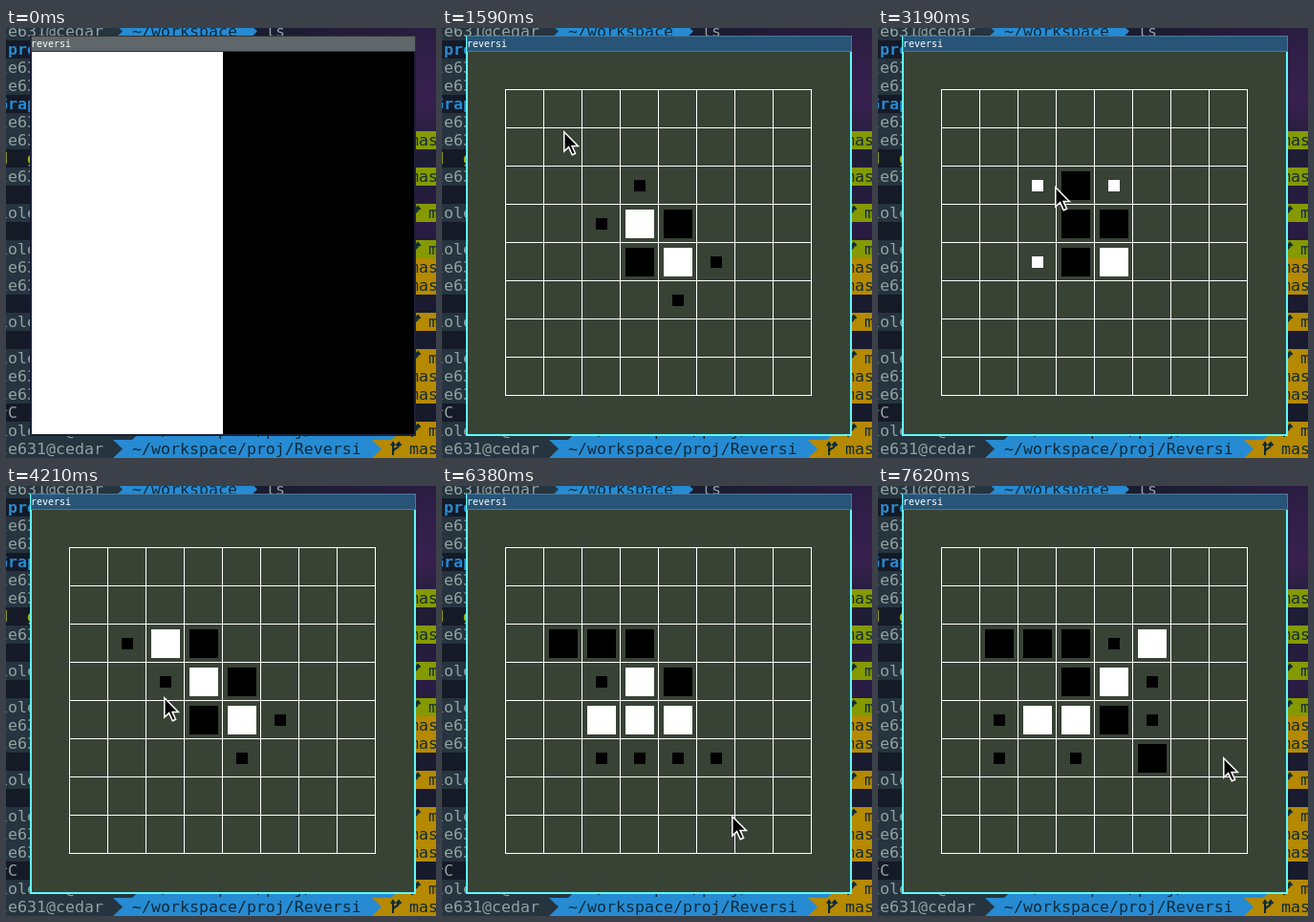
Recreate the animation shown at these times as an HTML page. Size 450x450 px, loop 8 s.

```html
<!DOCTYPE html>
<html lang="en">
<head>
<meta charset="utf-8">
<title>reversi</title>
<style>
html, body { margin: 0; width: 100%; height: 100%; overflow: hidden; background: #161a27; }
svg { display: block; width: 450px; height: 450px; }
text { font-family: "DejaVu Sans Mono", monospace; white-space: pre; }
.term text { font-size: 16.6px; }
.sharp { shape-rendering: crispEdges; }
</style>
</head>
<body>
<svg id="stage" viewBox="0 0 450 450">
  <defs>
    <linearGradient id="sky" x2="1" y2="0">
      <stop offset="0" stop-color="#151a27"/>
      <stop offset=".6" stop-color="#1a1c30"/>
      <stop offset="1" stop-color="#2b1d42"/>
    </linearGradient>
    <linearGradient id="side" x2="0" y2="1">
      <stop offset="0" stop-color="#2a1d42"/>
      <stop offset=".17" stop-color="#38204f"/>
      <stop offset=".3" stop-color="#1d1d33"/>
      <stop offset=".45" stop-color="#2b1c45"/>
      <stop offset=".62" stop-color="#1a1b31"/>
      <stop offset="1" stop-color="#161a29"/>
    </linearGradient>
  </defs>
  <rect width="450" height="450" fill="url(#sky)"/>
  <rect x="429" width="21" height="450" fill="url(#side)"/>
  <g class="term" id="term"></g>
  <g id="win"></g>
</svg>
<script>
const LOOP = 8000, TICK = 40;
const DARK = '#25343e', BLUE = '#268bd2', GREEN = '#859900', GOLD = '#b58900';
const GREY = '#93a1a1', INK = '#0d2a3a';

function add(parent, tag, attrs, content) {
  const el = document.createElementNS('http://www.w3.org/2000/svg', tag);
  for (const k in attrs) el.setAttribute(k, attrs[k]);
  if (content) el.textContent = content;
  parent.appendChild(el);
  return el;
}
const box = (g, x, y, width, height, fill) =>
  add(g, 'rect', { x, y, width, height, fill, class: 'sharp' });

// ---- terminal behind the window ----
const term = document.getElementById('term');

function write(x, mid, str, fill, weight = 400) {
  add(term, 'text', { x, y: mid + 6, fill, 'font-weight': weight }, str);
}

function segment(x, end, mid, fill, tip = true) {
  const t = mid - 9, b = mid + 10;
  const d = tip ? `M${x} ${t}H${end}L${end + 10} ${mid + .5}L${end} ${b}H${x}Z` : `M${x} ${t}H${end}V${b}H${x}Z`;
  add(term, 'path', { d, fill });
}

function branch(x, mid) {
  add(term, 'path', {
    d: `M${x + 2} ${mid - 6}V${mid + 7}M${x + 2} ${mid + 4}Q${x + 2} ${mid + 1} ${x + 5} ${mid}T${x + 8} ${mid - 4}` +
       `M${x + 5.5} ${mid - 3}L${x + 8} ${mid - 6}L${x + 10.5} ${mid - 3}M${x} ${mid - 3}L${x + 2} ${mid - 6}L${x + 4} ${mid - 3}`,
    fill: 'none', stroke: INK, 'stroke-width': 2
  });
}

function prompt(mid, user, path, git) {
  const x = -8, userEnd = x + user.length * 10, pathX = userEnd + 30;
  const pathEnd = pathX + path.length * 10 + 11;
  if (git) segment(pathEnd - 2, 450, mid, git, false);
  segment(userEnd + 9, pathEnd, mid, BLUE);
  segment(0, userEnd + 10, mid, DARK);
  write(x, mid, user, GREY);
  write(pathX, mid, path, INK);
  if (git) {
    branch(pathEnd + 20, mid);
    write(pathEnd + 39, mid, 'master', INK);
  }
}

const SHORT = 'le631@cedar', LONG = 'iole631@cedar';
const REPO = '~/workspace/proj/Reversi';
prompt(3, SHORT, '~/workspace');
write(272, 3, 'ls', GREY);
write(-8, 22, ' proj', BLUE, 700);
prompt(41, SHORT, '~/workspace');
prompt(60, SHORT, '~/workspace');
write(-8, 79, 'Grap', BLUE, 700);
prompt(98, SHORT, '~/workspace');
write(-8, 136, 'd  g', '#a3b010', 700);
write(-8, 402, '^C', GREY);
for (const y of [117, 155]) prompt(y, SHORT, REPO, GREEN);
for (const y of [193, 231]) prompt(y, LONG, REPO, GREEN);
for (const y of [307, 345, 421]) prompt(y, LONG, REPO, GOLD);
for (const y of [250, 269, 364, 383, 440]) prompt(y, SHORT, REPO, GOLD);

// ---- window ----
const win = document.getElementById('win');
const frame = box(win, 25, 8, 404, 419);
const edge = box(win, 26, 8, 403, 17);
const bar = box(win, 27, 9, 401, 15);
add(win, 'text', { x: 26, y: 20, fill: '#fff', 'font-size': 10 }, 'reversi');

const choice = add(win, 'g', {});
box(choice, 27, 25, 200, 400, '#fff');
box(choice, 227, 25, 200, 400, '#000');

const board = add(win, 'g', {});
box(board, 27, 25, 400, 400, '#384235');
for (let i = 0; i <= 8; i++) {
  box(board, 66 + 40 * i, 64, 1, 321, '#fff');
  box(board, 66, 64 + 40 * i, 321, 1, '#fff');
}

// ---- game rules ----
const DIRS = [-1, 0, 1].flatMap(r => [-1, 0, 1].map(c => [r, c])).filter(d => d[0] || d[1]);
const at = (grid, r, c) => (grid[r] || [])[c];

function flips(grid, row, col, who) {
  if (grid[row][col]) return [];
  return DIRS.flatMap(([dr, dc]) => {
    const run = [];
    let r = row + dr, c = col + dc;
    for (; at(grid, r, c) === -who; r += dr, c += dc) run.push([r, c]);
    return at(grid, r, c) === who ? run : [];
  });
}

function drawState(grid, next) {
  const g = add(board, 'g', {});
  const square = (r, c, size, who) =>
    box(g, 67 + 40 * c + 20 - size / 2, 65 + 40 * r + 20 - size / 2, size, size, who > 0 ? '#000' : '#fff');
  grid.forEach((line, r) => line.forEach((who, c) => {
    if (who) square(r, c, 30, who);
    else if (flips(grid, r, c, next).length) square(r, c, 12, next);
  }));
  return g;
}

// time, row, column; black (1) begins
const MOVES = [[2690, 2, 3], [3350, 2, 2], [4530, 2, 1], [5260, 4, 2], [6450, 5, 5], [7220, 2, 5]];
const START = 1590;
const grid = Array.from({ length: 8 }, () => Array(8).fill(0));
grid[3][3] = grid[4][4] = -1;
grid[3][4] = grid[4][3] = 1;
let turn = 1;
const states = [{ t: START, g: drawState(grid, turn) }];
for (const [t, r, c] of MOVES) {
  for (const [y, x] of [...flips(grid, r, c, turn), [r, c]]) grid[y][x] = turn;
  turn = -turn;
  states.push({ t, g: drawState(grid, turn) });
}

// ---- pointer ----
const pointer = add(win, 'path', {
  d: 'M.8 1.8V22L5.6 17.6L9.3 25.8L12.6 24.3L9 16.4H15.4Z',
  fill: '#000', stroke: '#fff', 'stroke-width': 1.5
});
const FOCUS = 1070, ENTER = 1110;
// start, ticks, x, y reached
const LEGS = [
  [ENTER, 1, 127, 107],
  [1960, 9, 210, 162],
  [3030, 7, 179, 166],
  [3700, 13, 165, 220],
  [4250, 7, 165, 260],
  [4570, 3, 164, 271],
  [5100, 1, 164, 257],
  [5140, 3, 164, 251],
  [5460, 7, 302, 343],
  [6380, 1, 303, 344],
  [6450, 8, 328, 235],
  [6980, 6, 289, 163],
  [7420, 6, 361, 283]
];
const smooth = p => p * p * (3 - 2 * p);

function pointerAt(t) {
  let [, , x, y] = LEGS[0];
  for (const [start, ticks, tx, ty] of LEGS) {
    if (t < start) break;
    const step = Math.min(ticks, Math.floor((t - start) / TICK) + 1);
    const p = smooth(step / ticks);
    x += (tx - x) * p;
    y += (ty - y) * p;
  }
  return [Math.round(x), Math.round(y)];
}

const show = (el, on) => el.setAttribute('visibility', on ? 'visible' : 'hidden');

function render(t) {
  const focused = t >= FOCUS;
  frame.setAttribute('fill', focused ? '#5ffafa' : '#1b2038');
  edge.setAttribute('fill', focused ? '#4c7899' : '#333333');
  bar.setAttribute('fill', focused ? '#285577' : '#5f676a');
  show(choice, t < START);
  board.style.display = t < START ? 'none' : '';
  const now = states.filter(s => s.t <= t).pop();
  for (const s of states) s.g.style.display = s === now ? '' : 'none';
  show(pointer, t >= ENTER);
  pointer.setAttribute('transform', `translate(${pointerAt(t)})`);
}

const t0 = performance.now();
function loop() {
  render((performance.now() - t0) % LOOP);
  requestAnimationFrame(loop);
}
loop();
</script>
</body>
</html>
```
